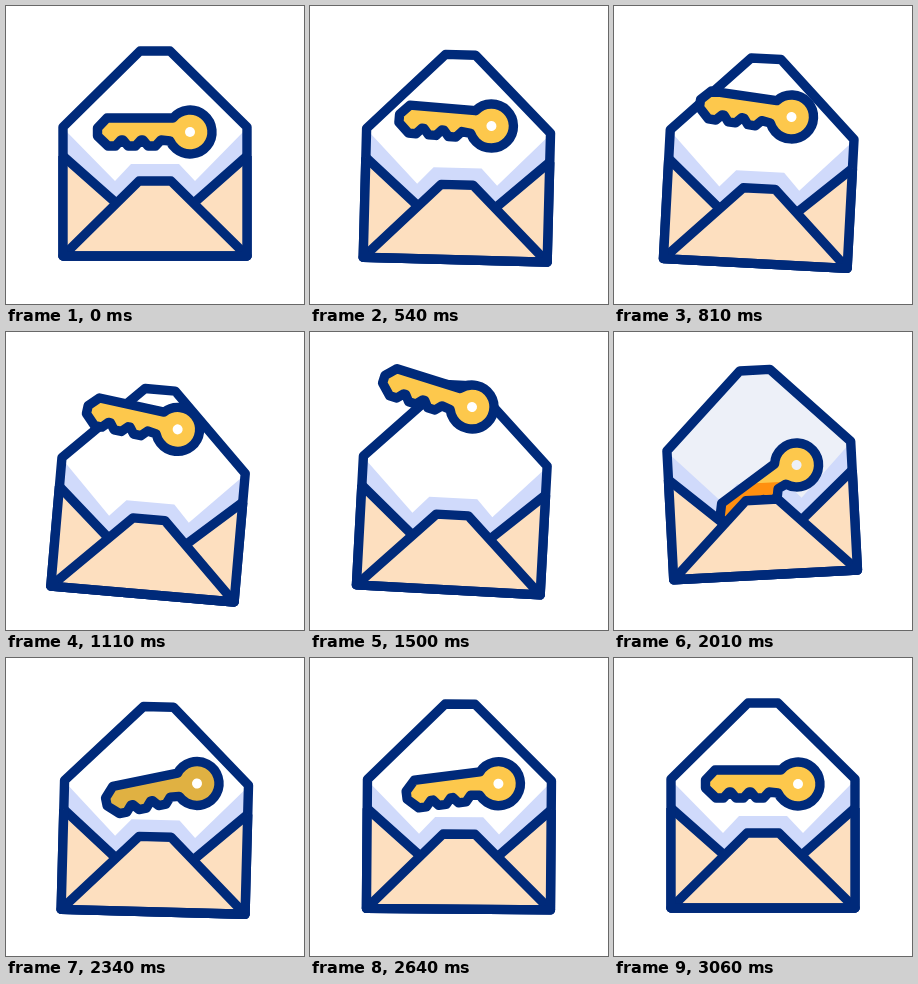
An HTML page with a canvas for the animation above (3300 ms loop, 298x298 px).

```html
<!DOCTYPE html>
<html lang="en">
<head>
<meta charset="utf-8">
<title>Key and envelope</title>
<style>
  html, body { margin: 0; width: 100%; height: 100%; overflow: hidden; background: #fff; }
  canvas { display: block; width: 298px; height: 298px; }
</style>
</head>
<body>
<canvas id="stage"></canvas>
<script>
const SIZE = 298, LOOP = 3300, STEP = 30, LINE = 9.4;
const NAVY = '#002a7a', PEACH = '#fddfbf', LILAC = '#d0dafb', ORANGE = '#ff8f0f';
const WHITE = [255, 255, 255], DUSK = [228, 232, 245];
const GOLD = [253, 200, 76], DIM = [224, 177, 66];

const canvas = document.getElementById('stage');
const ctx = canvas.getContext('2d');
const ratio = window.devicePixelRatio || 1;
canvas.width = canvas.height = Math.round(SIZE * ratio);

const linear = u => u;
const sine = u => (1 - Math.cos(Math.PI * u)) / 2;
const power = p => u => u ** p;
const out = u => 1 - (1 - u) ** 3;

// Each pose is reached at its time with its own ease; spin eases turn and dark.
const envelopePoses = [
  { at: 180, x: 149, y: 150, turn: 0 },
  { at: 1350, x: 143.8, y: 166.5, turn: 6.6, ease: power(1.25) },
  { at: 1790, x: 143.5, y: 134, turn: -6.8, ease: sine },
  { at: 2260, x: 149.8, y: 154, turn: 1.6, ease: sine },
  { at: 2850, x: 149, y: 150, turn: 0, ease: sine }
];
const keyPoses = [
  { at: 180, x: 184, y: 126, turn: 0, dark: 0 },
  { at: 1500, x: 162, y: 75, turn: 17.5, dark: 0, ease: power(1.65), spin: linear },
  { at: 1790, x: 152, y: 160, turn: -50, dark: 1, ease: sine },
  { at: 2340, x: 191, y: 125.5, turn: -11.5, dark: 0, ease: out, spin: sine },
  { at: 3060, x: 184, y: 126, turn: 0, dark: 0, ease: sine }
];

const lerp = (a, b, k) => a + (b - a) * k;
const mix = (a, b, k) => `rgb(${a.map((v, i) => Math.round(lerp(v, b[i], k))).join(',')})`;

function poseAt(poses, t) {
  const i = poses.findIndex(p => t < p.at);
  if (i < 0) return poses[poses.length - 1];
  if (i === 0) return poses[0];
  const a = poses[i - 1], b = poses[i], u = (t - a.at) / (b.at - a.at);
  const move = b.ease(u), spin = (b.spin || b.ease)(u);
  return {
    x: lerp(a.x, b.x, move),
    y: lerp(a.y, b.y, move),
    turn: lerp(a.turn, b.turn, spin),
    dark: lerp(a.dark, b.dark, spin)
  };
}

function poly(points, close = true) {
  const path = new Path2D();
  points.forEach(([x, y]) => path.lineTo(x, y));
  if (close) path.closePath();
  return path;
}

// Envelope shapes are drawn around its pivot, mirrored from the left half.
function mirrored(half, close) {
  const right = half.map(([x, y]) => [-x, y]).reverse();
  return poly([...half, ...right], close);
}

const paper = mirrored([[-92, 100], [-92, -29], [-15, -105]]);
const shade = mirrored([[-92, 100], [-92, -28], [-40, 25], [-24, 8]]);
const flapLine = mirrored([[-92, 0], [-40, 46]], false);
const pocket = poly([[-92, 0], [0, 81], [92, 0], [92, 100], [-92, 100]]);
const front = mirrored([[-92, 100], [-16, 25]]);
const sides = poly([[-92, 0], [-92, 100], [92, 100], [92, 0]], false);

// Key outline with the ring centre at the origin.
function makeKey() {
  const path = new Path2D();
  path.arc(0, 0, 22, Math.atan2(-14, -17), Math.atan2(9, -20));
  for (let tooth = 0; tooth < 3; tooth++) {
    const x = -38 - 20 * tooth;
    path.lineTo(x + 9, 8);
    path.lineTo(x + 3.5, 14);
    path.lineTo(x - 4, 14);
    if (tooth < 2) path.lineTo(x - 9, 8);
  }
  [[-92.5, 4], [-92.5, -4], [-83, -14]].forEach(([x, y]) => path.lineTo(x, y));
  path.closePath();
  return path;
}

const key = makeKey();
const hole = new Path2D();
hole.arc(0, 0, 5, 0, 2 * Math.PI);

function fill(path, color) {
  ctx.fillStyle = color;
  ctx.fill(path);
}

function stroke(path) {
  ctx.strokeStyle = NAVY;
  ctx.lineWidth = LINE;
  ctx.lineJoin = 'round';
  ctx.stroke(path);
}

function place({ x, y, turn }) {
  ctx.setTransform(ratio, 0, 0, ratio, 0, 0);
  ctx.translate(x, y);
  ctx.rotate(turn * Math.PI / 180);
}

function render(t) {
  const envelope = poseAt(envelopePoses, t);
  const keyPose = poseAt(keyPoses, t);
  const sheet = mix(WHITE, DUSK, keyPose.dark);
  const dim = Math.max(0, 1 - Math.abs(t - 2340) / 200);

  ctx.setTransform(ratio, 0, 0, ratio, 0, 0);
  ctx.fillStyle = '#fff';
  ctx.fillRect(0, 0, SIZE, SIZE);

  place(envelope);
  fill(paper, sheet);
  fill(shade, LILAC);
  stroke(paper);

  place(keyPose);
  fill(key, mix(GOLD, DIM, dim));
  // The part of the key that dips into the shaded pocket.
  if (keyPose.dark > 0) {
    ctx.save();
    place(envelope);
    ctx.clip(shade);
    place(keyPose);
    fill(key, ORANGE);
    ctx.restore();
  }
  stroke(key);
  fill(hole, sheet);

  place(envelope);
  fill(pocket, PEACH);
  stroke(flapLine);
  fill(front, PEACH);
  stroke(front);
  stroke(sides);
}

const start = performance.now();
function tick() {
  const t = (performance.now() - start) % LOOP;
  render(Math.floor(t / STEP) * STEP);
  requestAnimationFrame(tick);
}
tick();
</script>
</body>
</html>
```
